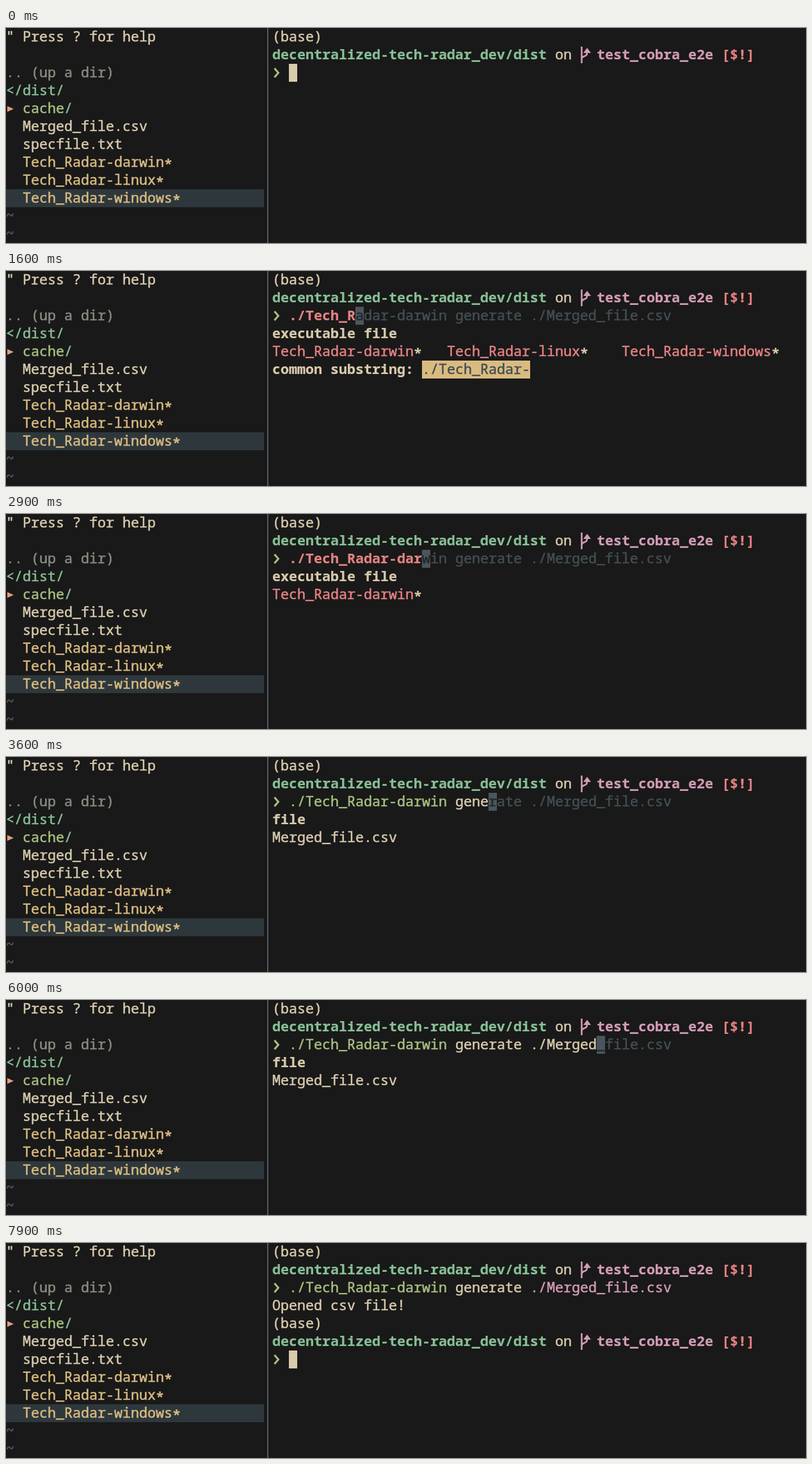
Animation of 1250x336 px, one loop 8 s. Source, as an HTML page:

```html
<!DOCTYPE html>
<html lang="en">
<head>
<meta charset="utf-8">
<title>Terminal session</title>
<style>
  html, body { margin: 0; width: 100%; height: 100%; overflow: hidden; background: #191919; }
  svg { display: block; width: 1250px; height: 336px; }
  text {
    font-family: "Noto Sans Mono", "DejaVu Sans Mono", monospace;
    font-size: 21.667px;
    white-space: pre;
    font-variant-ligatures: none;
    stroke-width: .5px;
  }
  .bold { font-weight: 700; stroke-width: .2px; }
  .under { text-decoration: underline; }
</style>
</head>
<body>
<svg viewBox="0 0 1250 336">
  <rect width="1250" height="336" fill="#191919"/>
  <g id="tree"></g>
  <g id="shell"></g>
</svg>
<script>
const LOOP = 8000, CELL = 13, ROW = 28, PANE = 416;
const C = {
  fg: '#d8caac', red: '#e68183', orange: '#e39b7b', yellow: '#d9bb80',
  green: '#a7c080', aqua: '#87c095', purple: '#d39bb6', grey: '#868d80',
  dim: '#434e53', block: '#4b565c', line: '#505a60', select: '#2e383c', dark: '#22282b'
};

const command = './Tech_Radar-darwin generate ./Merged_file.csv';
const CMD_END = 19, ARG_START = 29;
// Time of each keystroke, in tenths of a second
const keys = [
  4, 6, 8, 9, 10, 12, 14, 16, 17, 18, 19, 20, 22, 24, 26, 28, 30, 31, 32, 33,
  34, 34, 35, 36, 37, 38, 39, 40, 42, 44, 46,
  52, 54, 55, 56, 58, 59, 61, 62, 64, 65, 66, 67, 68, 70, 71
];
const ENTER = 74, OUTPUT = 75, DONE = 77;

const rect = (x, y, w, h, fill) =>
  `<rect x="${x}" y="${y}" width="${w}" height="${h}" fill="${fill}"/>`;

const escape = s => s.replace(/&/g, '&amp;').replace(/</g, '&lt;');

function write(x0, row, col, s, fill, cls = '') {
  if (!s) return '';
  const y = row * ROW + (s === '*' ? 24 : 21);
  return `<text x="${x0 + col * CELL}" y="${y}" fill="${fill}" stroke="${fill}" class="${cls}">${escape(s)}</text>`;
}

const left = (...args) => write(0, ...args);
const right = (...args) => write(PANE, ...args);
const block = (row, col, fill, cells = 1) =>
  rect(PANE + col * CELL, row * ROW, cells * CELL, ROW, fill);

function executable(put, row, col, name, fill, starFill) {
  return put(row, col, name, fill) + put(row, col + name.length, '*', starFill, 'bold');
}

function tree() {
  const names = ['darwin', 'linux', 'windows'];
  return rect(0, 9 * ROW, 403, ROW, C.select) +
    rect(408, 0, 2, 336, C.line) +
    left(0, 0, '" Press ? for help', C.fg) +
    left(2, 0, '.. (up a dir)', C.grey) +
    left(3, 0, '</dist/', C.aqua) +
    `<path d="M2 122L12 126.5L2 131Z" fill="${C.orange}"/>` +
    left(4, 2, 'cache', C.green) + left(4, 7, '/', C.aqua) +
    left(5, 2, 'Merged_file.csv', C.fg) +
    left(6, 2, 'specfile.txt', C.fg) +
    names.map((n, i) => executable(left, 7 + i, 2, 'Tech_Radar-' + n, C.yellow, C.yellow)).join('') +
    left(10, 0, '~', C.line) + left(11, 0, '~', C.line);
}

function prompt(row) {
  const y = row * ROW;
  return right(row, 0, '(base)', C.fg) +
    right(row + 1, 0, 'decentralized-tech-radar_dev/dist', C.aqua, 'bold') +
    right(row + 1, 34, 'on', C.fg) +
    `<g transform="translate(897 ${y + 28})" fill="none" stroke="${C.purple}" stroke-width="2.6">
      <path d="M2.5 1V27M2.5 20Q3 17 7 16Q11 15 11 10"/>
      <path d="M11 3L17 11H5Z" fill="${C.purple}" stroke="none"/>
    </g>` +
    right(row + 1, 39, 'test_cobra_e2e', C.purple, 'bold') +
    right(row + 1, 54, '[$!]', C.red, 'bold') +
    `<path d="M419.5 ${y + 63}L425.5 ${y + 70}L419.5 ${y + 77}" fill="none" stroke="${C.green}" stroke-width="3"/>`;
}

function commandStyle(n) {
  if (n === 1 || n >= CMD_END) return [C.green];
  return n === 2 ? [C.purple, 'under'] : [C.red, 'bold'];
}

function pathStyle(n) {
  if (n === command.length) return [C.purple];
  return n <= ARG_START + 2 ? [C.purple, 'under'] : [C.fg];
}

function typed(n) {
  const done = command.slice(0, n);
  return right(2, 2, done.slice(0, CMD_END), ...commandStyle(n)) +
    right(2, 2 + CMD_END, done.slice(CMD_END, ARG_START), C.fg) +
    right(2, 2 + ARG_START, done.slice(ARG_START), ...pathStyle(n));
}

function suggestion(n) {
  const col = n + 2;
  if (n === 0 || n === command.length) return block(2, col, C.fg);
  return block(2, col, C.block) +
    right(2, col, command[n], C.dark) +
    right(2, col + 1, command.slice(n + 1), C.dim);
}

function completions(n) {
  if (n < 3) return '';
  if (n > CMD_END) {
    const both = n === CMD_END + 1 || (n >= ARG_START && n <= ARG_START + 2);
    return right(3, 0, 'file', C.fg, 'bold') +
      right(4, 0, 'Merged_file.csv', C.fg) +
      (both ? right(4, 17, 'specfile.txt', C.fg) : '');
  }
  const names = n < 14 ? ['darwin', 'linux', 'windows'] : ['darwin'];
  let out = right(3, 0, 'executable file', C.fg, 'bold') +
    names.map((s, i) => executable(right, 4, i * 21, 'Tech_Radar-' + s, C.red, C.fg)).join('');
  if (n < 13) {
    out += right(5, 0, 'common substring:', C.fg, 'bold') +
      block(5, 18, C.yellow, 13) + right(5, 18, './Tech_Radar-', C.dim);
  }
  return out;
}

function shell(step) {
  const n = keys.filter(k => k <= step).length;
  const top = prompt(0) + typed(n);
  if (step < ENTER) return top + suggestion(n) + completions(n);
  if (step < OUTPUT) return top + block(3, 0, C.fg);
  const output = top + right(3, 0, 'Opened csv file!', C.fg);
  if (step < DONE) return output + block(4, 0, C.fg);
  return output + prompt(4) + block(6, 2, C.fg);
}

const shellNode = document.getElementById('shell');
let shown = -1;

function draw(t) {
  const step = Math.floor((t % LOOP) / 100);
  if (step === shown) return;
  shown = step;
  shellNode.innerHTML = shell(step);
}

document.getElementById('tree').innerHTML = tree();
const start = performance.now();
function tick() {
  draw(performance.now() - start);
  requestAnimationFrame(tick);
}
tick();
</script>
</body>
</html>
```
